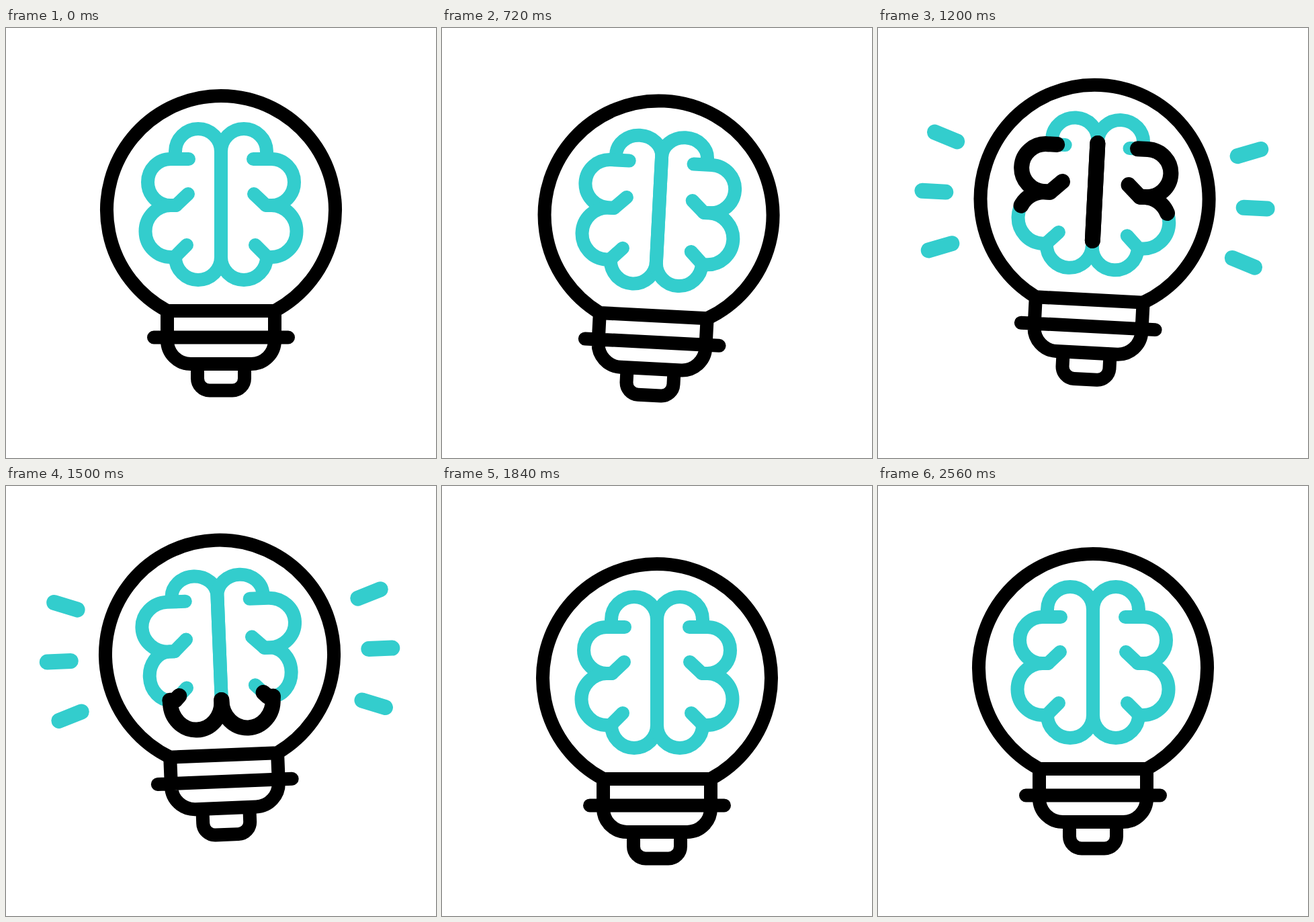
An HTML page for the animation above (2.76 s loop, 640 by 640 pixels).

```html
<!DOCTYPE html>
<html lang="en">
<head>
<meta charset="utf-8">
<title>Bright idea</title>
<style>
  html, body { margin: 0; width: 100%; height: 100%; overflow: hidden; background: #fff; }
  svg { display: block; width: 100vw; height: 100vh; }
  path { fill: none; stroke: #000; stroke-width: 20; stroke-linecap: round; stroke-linejoin: round; }
  .cyan { stroke: #33cdcd; }
  .ray, .run { stroke-width: 23; }
</style>
</head>
<body>
<svg viewBox="0 0 640 640">
  <g id="all">
    <g id="brain"></g>
    <path d="M240 421A170 170 0 1 1 400 421Z"/>
    <path d="M240 421V465A35 35 0 0 0 275 500H365A35 35 0 0 0 400 465V421M220 460.5H420"/>
    <path d="M285 502V521.5A18 18 0 0 0 303 539.5H337A18 18 0 0 0 355 521.5V502"/>
  </g>
</svg>
<script>
const LOOP = 2760;
const { PI, sin, cos, min, max } = Math;

const ramp = (t, a, b) => min(1, max(0, (t - a) / (b - a)));
const ease = (t, a, b) => (1 - cos(PI * ramp(t, a, b))) / 2;
const easeOut = (t, a, b) => 1 - (1 - ramp(t, a, b)) ** 2;
const hump = (t, a, b, n = 1) => sin(PI * n * ramp(t, a, b));

// Dip, long rise, fall, then a settling bounce
const height = t =>
  33 * ease(t, 220, 420) - 53.5 * easeOut(t, 420, 1500) + 41 * ease(t, 1500, 1790)
  - 27 * ease(t, 1790, 1960) + 13 * ease(t, 1960, 2360) - 6.5 * ease(t, 2360, 2560);

// One lean, then two and a half swings
const turn = t => 5.5 * hump(t, 220, 609) + 3 * hump(t, 609, 1809, 5);

// Left half of the brain; its lobes swell and shrink in turn
function lobes(t) {
  const first = hump(t, 480, 960), second = hump(t, 1100, 1800), low = 7 * hump(t, 1200, 1800);
  const top = 34 - 4 * first - 3.5 * second;
  const up = 2.5 * first + 5 * second;
  const rx = 34 + low * .6;
  const drop = low * .6;
  return [
    `M252 ${190 - up}V184A34 ${top} 0 0 1 320 184V341A${rx} ${34 + low} 0 0 1 ${320 - 2 * rx} 341`,
    `M272 ${195 - up}H245A${34 + up} ${34.5 + up / 2} 0 0 0 245 264H253`,
    `M271 247L253 264H245A${38 - low} ${38.5 - drop / 2} 0 0 0 246 ${341 - drop}H251L269 ${323 - drop}`
  ];
}

// Visible range [tail, head] of each black stroke
const runRange = t => [
  [ramp(t, 957, 1768), ramp(t, 780, 1389)],
  [ramp(t, 1178, 1460), ramp(t, 800, 1180)],
  [ramp(t, 1200, 1575), ramp(t, 949, 1561)]
];

function rayPath(i, from, to) {
  const k = i - 1;
  const pt = u => `${98 + 13 * k * k - (35 - k * k) * u} ${272 + k * (76 + 12 * u)}`;
  return `M${pt(from)}L${pt(to)}`;
}

const all = document.getElementById('all');
const brain = document.getElementById('brain');

function add(cls, flip) {
  const p = document.createElementNS('http://www.w3.org/2000/svg', 'path');
  p.setAttribute('class', cls);
  p.setAttribute('pathLength', 1);
  if (flip) p.setAttribute('transform', 'matrix(-1 0 0 1 640 0)');
  brain.append(p);
  return p;
}

const group = cls => [0, 1, 2].map(() => [add(cls, false), add(cls, true)]);
const rays = group('cyan ray'), base = group('cyan'), runs = group('run');

function setPath(pair, d, shown = true) {
  for (const p of pair) {
    p.setAttribute('d', d);
    p.style.display = shown ? '' : 'none';
  }
}

function draw(t) {
  all.setAttribute('transform', `translate(0 ${height(t)}) rotate(${turn(t)} 320 320)`);

  const ranges = runRange(t);
  lobes(t).forEach((d, i) => {
    const [tail, head] = ranges[i], len = head - tail;
    setPath(base[i], d);
    setPath(runs[i], d, len > .001);
    for (const p of runs[i]) {
      p.setAttribute('stroke-dasharray', `${max(0, len)} 2`);
      p.setAttribute('stroke-dashoffset', -tail);
    }
  });

  const from = ease(t, 1580, 1740), to = ease(t, 780, 940);
  rays.forEach((pair, i) => setPath(pair, rayPath(i, from, to), to - from > .01));
}

const start = performance.now();
function tick() {
  draw((performance.now() - start) % LOOP);
  requestAnimationFrame(tick);
}
tick();
</script>
</body>
</html>
```
